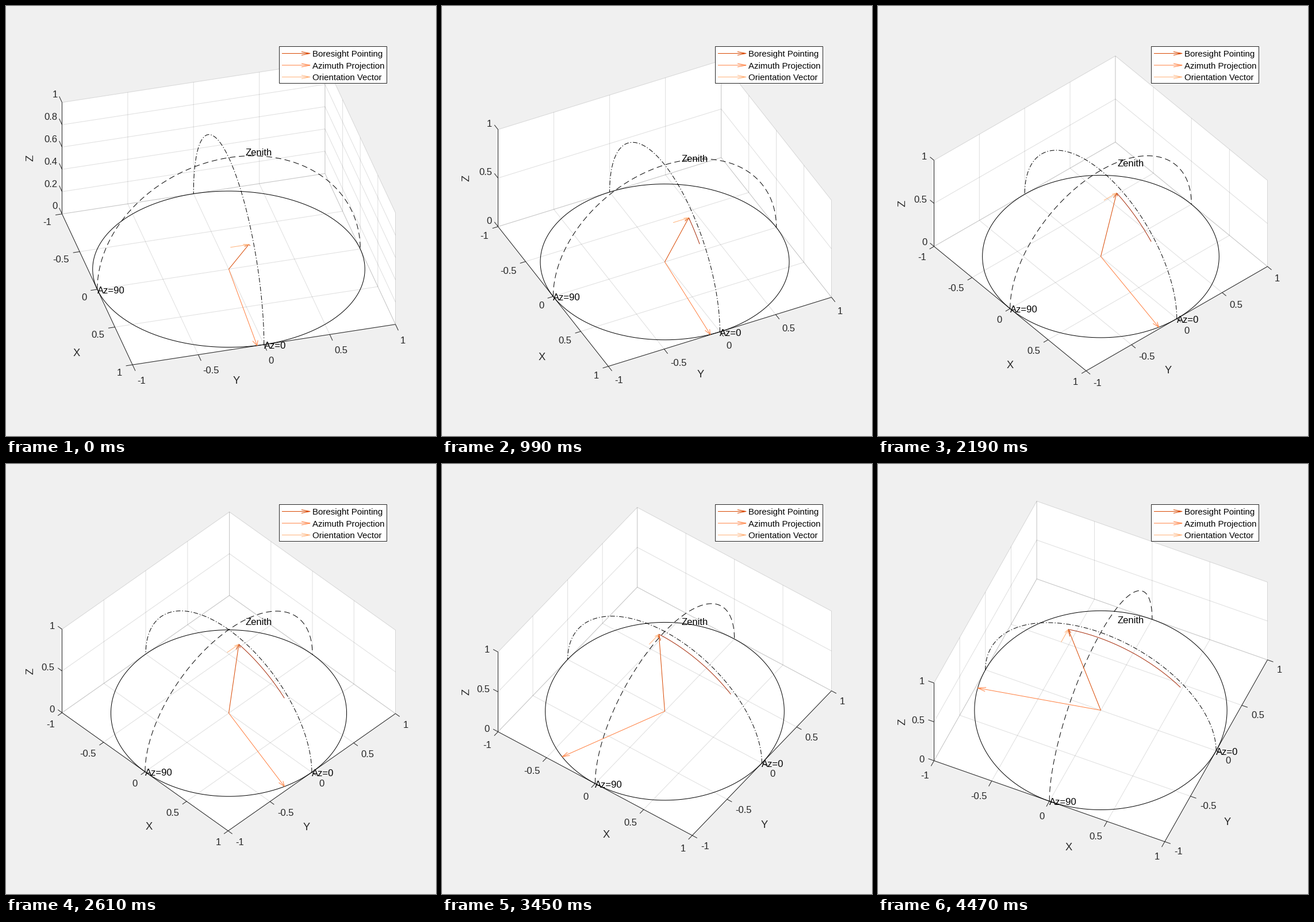
A matplotlib script for the animation above (4.5 s loop, 748 by 748 pixels).

```python
import numpy as np
import matplotlib.pyplot as plt
from matplotlib.animation import FuncAnimation
from matplotlib.collections import LineCollection

SIZE, DPI = 748, 100
FRAMES, INTERVAL = 150, 30
PX = 72 / DPI                      # one pixel in points
MID_X, MID_Y, BOX_W = 387.5, 360.8, 580
INK = "#262626"
BORESIGHT, AZIMUTH, ORIENT, TRACK = "#D94801", "#FF7F3F", "#FFB27A", "#A62A08"
TICKS = np.linspace(-1, 1, 5)
TILT = np.radians(3)

plt.rcParams["font.family"] = "Liberation Sans"
plt.rcParams["path.snap"] = False
fig = plt.figure(figsize=(SIZE / DPI, SIZE / DPI), dpi=DPI, facecolor="#F0F0F0")
ax = fig.add_axes([0, 0, 1, 1])


class View:
    """Orthographic camera that fits the box to a fixed width."""

    def __init__(self, azim, elev):
        a, e = np.radians([azim, elev])
        scale = BOX_W / (2 * (np.cos(a) + np.sin(a)))
        self.ex = scale * np.array([np.sin(a), np.sin(e) * np.cos(a)])
        self.ey = scale * np.array([np.cos(a), -np.sin(e) * np.sin(a)])
        self.ez = scale * np.array([0, -np.cos(e)])
        self.origin = np.array([MID_X, MID_Y]) - self.ez / 2

    def __call__(self, points):
        return self.origin + np.asarray(points) @ np.array([self.ex, self.ey, self.ez])


def stroke(pts, color="black", **style):
    pts = np.asarray(pts)
    style = {"lw": PX, "solid_capstyle": "butt", **style}
    ax.plot(pts[:, 0], pts[:, 1], color=color, **style)


def label(x, y, text, size=16.67, color="black", ha="left", **style):
    """Place text with the middle of its capitals at height y."""
    ax.text(x, y + 0.35 * size, text, fontsize=size * PX, color=color,
            ha=ha, va="baseline", **style)


def arrow(view, start, vec, color, head, half):
    """Arrow in space; its barbs lie level with the floor."""
    start, vec = np.asarray(start, float), np.asarray(vec, float)
    tip, unit = start + vec, vec / np.linalg.norm(vec)
    side = np.array([-unit[1], unit[0], 0])
    side *= half / np.linalg.norm(side)
    base = tip - head * unit
    stroke(view([start, tip]), color)
    stroke(view([base + side, tip, base - side]), color)


def pointing(t):
    """Points on a great circle leaning slightly off the zenith."""
    return np.stack([np.cos(t), -np.sin(TILT) * np.sin(t),
                     np.cos(TILT) * np.sin(t)], axis=-1)


def draw_box(view, z_ticks):
    outline = [(-1, -1, 0), (1, -1, 0), (1, 1, 0), (1, 1, 1), (-1, 1, 1), (-1, -1, 1)]
    ax.fill(*view(outline).T, color="white", lw=0)
    grid = []
    for t in TICKS:
        grid += [[(t, -1, 0), (t, 1, 0)], [(-1, t, 0), (1, t, 0)],
                 [(-1, t, 0), (-1, t, 1)], [(t, 1, 0), (t, 1, 1)]]
    for z in z_ticks:
        grid += [[(-1, -1, z), (-1, 1, z)], [(-1, 1, z), (1, 1, z)]]
    ax.add_collection(LineCollection(view(grid), colors=[(0.15, 0.15, 0.15, 0.15)],
                                     linewidths=PX, zorder=1.5))


def draw_rulers(view, z_ticks, n):
    length = 0.05 * max(np.hypot(*view.ex), np.hypot(*view.ey))
    along_x = view.ex / np.hypot(*view.ex)
    along_y = view.ey / np.hypot(*view.ey)
    rulers = [([(t, -1, 0) for t in TICKS], 0, -along_y, "right", 10.3),
              ([(1, t, 0) for t in TICKS], 1, along_x, "left", 10.3),
              ([(-1, -1, z) for z in z_ticks], 2, -along_x, "right", 2.5)]
    for points, axis, out, ha, drop in rulers:
        stroke(view([points[0], points[-1]]), INK)
        for point in points:
            p = view(point)
            stroke([p, p + length * out], INK)
            x, y = p + (length + 6.8) * out
            label(x, y + drop, f"{point[axis]:.2g}", color=INK, ha=ha)

    x, y = view((0, -1, 0)) + (-36.5 + 0.54 * n - 0.00049 * n**2,
                               110 - 0.155 * n - 0.00035 * n**2)
    label(x, y, "X", 18.33, INK, "center")
    x, y = view((1, 0, 0)) + (-48.3 + 0.455 * n, 62 + 0.32 * n + 0.0006 * n**2)
    label(x, y, "Y", 18.33, INK, "center")
    x, y = view((-1, -1, 0.5))
    ax.text(43, y, "Z", fontsize=18.33 * PX, color=INK, rotation=90,
            ha="center", va="center")


def draw_sphere(view):
    t = np.linspace(0, 2 * np.pi, 181)
    stroke(view(np.stack([np.cos(t), np.sin(t), 0 * t], axis=-1)))
    t = np.linspace(0, np.pi, 121)
    stroke(view(np.stack([np.cos(t), 0 * t, np.sin(t)], axis=-1)),
           dashes=(8, 3, 1.5, 3))
    stroke(view(np.stack([0 * t, -np.cos(t), np.sin(t)], axis=-1)), dashes=(10, 6))


def draw_legend():
    ax.fill([475.5, 662.5, 662.5, 475.5], [70.5, 70.5, 134.5, 134.5],
            fc="white", ec=INK, lw=PX, zorder=5)
    rows = [("Boresight Pointing", BORESIGHT), ("Azimuth Projection", AZIMUTH),
            ("Orientation Vector", ORIENT)]
    for i, (text, color) in enumerate(rows):
        y = 82.5 + 20.5 * i
        stroke([(480, y), (529, y)], color, zorder=6)
        stroke([(514, y - 3), (529, y), (514, y + 3)], color, zorder=6)
        label(533, y + 0.5, text, 15, zorder=6)


def update(n):
    ax.clear()
    ax.set(xlim=(0, SIZE), ylim=(SIZE, 0))
    ax.axis("off")

    u = n / (FRAMES - 1)
    view = View(15 + 51 * u, 35 + 17 * u)
    z_ticks = np.linspace(0, 1, 6 if -view.ez[1] > 180 else 3)
    draw_box(view, z_ticks)
    draw_rulers(view, z_ticks, n)
    draw_sphere(view)

    angle = np.radians(45 + 60 * u)
    tip = pointing(angle)
    level = tip * (1, 1, 0)
    arrow(view, (0, 0, 0), tip, BORESIGHT, 0.064, 0.02)
    arrow(view, (0, 0, 0), level / np.linalg.norm(level), AZIMUTH, 0.064, 0.02)
    arrow(view, tip - (0, 0.14, 0), (0, 0.14, 0), ORIENT, 0.04, 0.013)
    if n:
        stroke(view(pointing(np.linspace(np.radians(45), angle, n + 1))), TRACK)

    for point, text, drop in [((1, 0, 0), "Az=0", 1), ((0, -1, 0), "Az=90", 1),
                              ((0.1, 0.1, 1.1), "Zenith", 0)]:
        x, y = view(point)
        label(x, y + drop, text)
    draw_legend()
    return []


anim = FuncAnimation(fig, update, frames=FRAMES, interval=INTERVAL,
                     init_func=lambda: [], repeat=True, repeat_delay=0)
plt.show()
```
